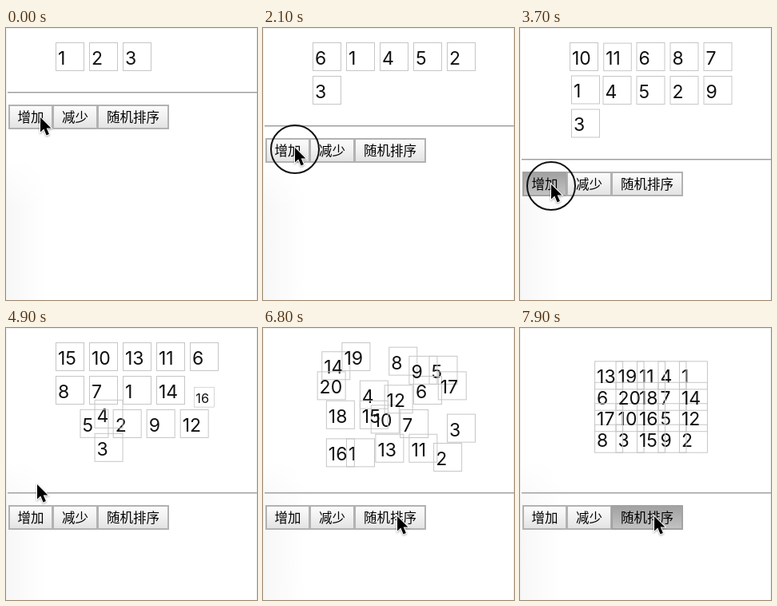
Write an HTML page that moves like this. It is 314 px wide and 341 px high and loops after 8 s.

```html
<!DOCTYPE html>
<html lang="zh">
<head>
<meta charset="utf-8">
<title>List transitions</title>
<style>
html, body { margin: 0; width: 100%; height: 100%; overflow: hidden; background: #fff; }
#stage { position: relative; width: 314px; height: 341px; overflow: hidden; background: #fff; }
#stage > * { position: absolute; box-sizing: border-box; }
#edge { inset: 0; border: 1px solid #f0f0f0; border-bottom: 0; }
#shade {
  left: 0; top: 165px; width: 52px; height: 176px;
  background: linear-gradient(90deg, #f7f7f7, #fff);
  -webkit-mask-image: linear-gradient(transparent, #000 60px);
  mask-image: linear-gradient(transparent, #000 60px);
}
.item {
  left: 0; top: 0; width: 36px; height: 36px; padding-left: 2px;
  border: 1px solid #c6c6c6; color: #111; white-space: nowrap;
  font: 23px/38px Inter, "Liberation Sans", sans-serif;
}
#panel { left: 0; top: 80px; width: 314px; height: 48px; }
#rule { position: absolute; left: 2px; right: 0; top: 0; height: 2px; background: linear-gradient(#a0a0a0 50%, #cfcfcf 50%); }
.btn {
  position: absolute; top: 16px; height: 31px; box-sizing: border-box;
  border: 2px solid #b2b2b2; background: linear-gradient(#fbfbfb, #f2f2f2 45%, #e3e3e3);
  font: 16.5px/26px "Noto Sans CJK SC", "Noto Sans CJK", sans-serif;
  color: #000; text-align: center; white-space: nowrap;
}
.btn.down { background: linear-gradient(#a2a2a2, #c2c2c2); border-color: #a2a2a2; }
#pointer { left: 0; top: 0; overflow: visible; }
#pointer path { filter: drop-shadow(0 1px 1px #0005); }
</style>
</head>
<body>
<div id="stage">
  <div id="shade"></div>
  <div id="edge"></div>
  <div id="panel">
    <div id="rule"></div>
    <div class="btn" style="left:3px;width:56px">增加</div>
    <div class="btn" style="left:58px;width:57px">减少</div>
    <div class="btn" style="left:114px;width:90px">随机排序</div>
  </div>
  <svg id="pointer" width="1" height="1">
    <circle id="ring" cx="0" cy="2" r="30" fill="none" stroke="#111" stroke-width="2"/>
    <path d="M0 0V18.5L4.3 14.6L7.6 22.4L10.9 21L7.7 13.5H13.4Z" fill="#000" stroke="#fff" stroke-width="2" paint-order="stroke"/>
  </svg>
</div>
<script>
const LOOP = 8000, MOVE = 300, STEP = 42, GLIDE = 150;
const CENTRE = [146, 81];
const stage = document.getElementById('stage');
const panel = document.getElementById('panel');
const pointer = document.getElementById('pointer');
const ring = document.getElementById('ring');
const buttons = document.querySelectorAll('.btn');

const burst = (from, count, gap) => Array.from({ length: count }, (_, i) => from + i * gap);
const addTimes = [
  ...burst(450, 3, 410), ...burst(2180, 5, 316),
  ...burst(3755, 5, 255), ...burst(5100, 4, 180)
];
// Index where each new number goes, from 4 up
const inserts = [1, 2, 0, 1, 1, 7, 0, 1, 10, 1, 7, 0, 9, 0, 1, 0, 1];

const firstMix = [14, 19, 8, 9, 5, 20, 4, 12, 6, 17, 18, 15, 10, 7, 3, 16, 1, 13, 11, 2];
const nextMix = [13, 19, 11, 4, 1, 6, 20, 18, 7, 14, 17, 10, 16, 5, 12, 8, 3, 15, 9, 2];
const mixTimes = [6629, 7150, 7600];
const clicks = [...addTimes, ...mixTimes, 7960];

// Pointer stops: [arrival time, x, y]
const stops = [
  [0, 43, 112], [1980, 40, 150], [3620, 39, 196],
  [5050, 39, 238], [5950, 133, 282], [6450, 168, 236]
];

const mix = (a, b, k) => a + (b - a) * k;
const blend = (p, q, k) => p.map((v, i) => mix(v, q[i], k));
const slot = i => [62 + i % 5 * STEP, 18 + Math.floor(i / 5) * STEP];

// cubic-bezier(.25, .1, .25, 1)
function ease(x) {
  if (x <= 0) return 0;
  if (x >= 1) return 1;
  const curve = (a, b, u) => 3 * a * u * (1 - u) ** 2 + 3 * b * u * u * (1 - u) + u ** 3;
  let lo = 0, hi = 1;
  for (let i = 0; i < 24; i++) {
    const mid = (lo + hi) / 2;
    if (curve(.25, .25, mid) < x) lo = mid; else hi = mid;
  }
  return curve(.1, 1, lo);
}

const items = [];
function addItem(n, born, at) {
  const el = document.createElement('div');
  el.className = 'item';
  el.textContent = n;
  stage.insertBefore(el, pointer);
  items[n] = { el, born, legs: [{ time: born, from: at, to: at }] };
}

function place(item, t) {
  const leg = item.legs.findLast(l => l.time <= t) || item.legs[0];
  return blend(leg.from, leg.to, ease((t - leg.time) / MOVE));
}

// Sends every number to its slot, pulled towards the centre by `pull`
function arrange(list, t, pull = 0) {
  list.forEach((n, i) => {
    const { legs } = items[n];
    const to = blend(slot(i), CENTRE, pull);
    if (String(legs[legs.length - 1].to) !== String(to))
      legs.push({ time: t, from: place(items[n], t), to });
  });
}

const order = [1, 2, 3];
order.forEach((n, i) => addItem(n, -LOOP, slot(i)));
inserts.forEach((index, i) => {
  order.splice(index, 0, i + 4);
  addItem(i + 4, addTimes[i], slot(index));
  arrange(order, addTimes[i]);
});
arrange(firstMix, mixTimes[0]);
arrange(nextMix, mixTimes[1]);
arrange(nextMix, mixTimes[2], .37);

function pointerAt(t) {
  const i = stops.findLastIndex(s => t >= s[0] - GLIDE);
  const [time, ...to] = stops[i];
  const [, ...from] = stops[Math.max(0, i - 1)];
  const k = Math.min(1, (t - time) / GLIDE + 1);
  return blend(from, to, k * k * (3 - 2 * k));
}

function draw(t) {
  let count = 0;
  items.forEach(item => {
    const shown = t >= item.born;
    item.el.style.visibility = shown ? 'visible' : 'hidden';
    if (!shown) return;
    count++;
    const [x, y] = place(item, t);
    const grow = ease((t - item.born) / MOVE);
    item.el.style.transform = `translate(${x}px, ${y + 30 * (1 - grow)}px) scale(${grow})`;
  });
  panel.style.transform = `translateY(${(Math.ceil(count / 5) - 1) * STEP}px)`;

  const pressed = clicks.some(c => t >= c - 75 && t < c);
  buttons[0].classList.toggle('down', pressed && t < 6000);
  buttons[2].classList.toggle('down', pressed && t > 6000);
  const ringed = clicks.some(c => c < 7300 && t >= c - 120 && t < c + 20);
  ring.style.visibility = ringed ? 'visible' : 'hidden';
  const [px, py] = pointerAt(t);
  pointer.style.transform = `translate(${px}px, ${py}px)`;
}

const start = performance.now();
function tick() {
  draw((performance.now() - start) % LOOP);
  requestAnimationFrame(tick);
}
tick();
</script>
</body>
</html>
```
